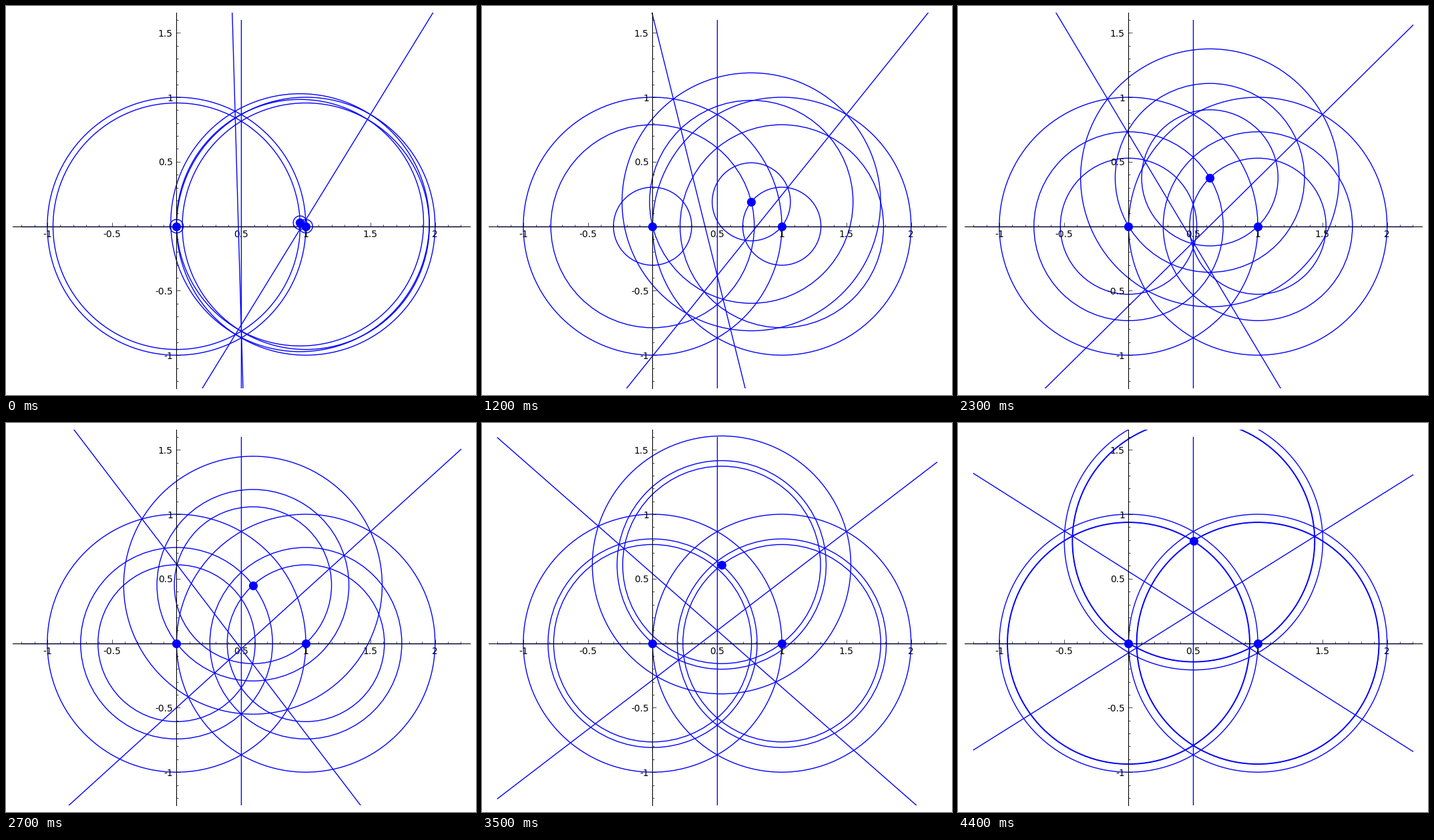
A matplotlib script for the animation above (4500 ms loop, 704 px wide and 584 px high).

```python
import numpy as np
import matplotlib.pyplot as plt
from matplotlib.animation import FuncAnimation
from matplotlib.patches import Circle
from matplotlib.ticker import FuncFormatter, MultipleLocator

W, H, DPI = 704, 584, 100
FRAMES, INTERVAL = 45, 100
BLUE = (0, 0, 1)
X_LINE = np.array([-1.2, 2.2])
X_LIM = (-1.268, 2.268)
Y_LIM = (-1.256, 1.656)
UNIT = 193.6  # pixels per data unit
A, B = np.array([0.0, 0.0]), np.array([1.0, 0.0])
PIVOT = np.array([1.5, np.sqrt(3) / 2])

plt.rcParams["font.family"] = "DejaVu Sans"
fig = plt.figure(figsize=(W / DPI, H / DPI), dpi=DPI, facecolor="white")

box_w = UNIT * (X_LIM[1] - X_LIM[0])
box_h = UNIT * (Y_LIM[1] - Y_LIM[0])
ax = fig.add_axes([10 / W, (H - 10 - box_h) / H, box_w / W, box_h / H])
ax.set(xlim=X_LIM, ylim=Y_LIM)
ax.patch.set_visible(False)


def style_axes():
    for side in ("top", "right"):
        ax.spines[side].set_visible(False)
    for side in ("left", "bottom"):
        ax.spines[side].set_position(("data", 0))
        ax.spines[side].set_linewidth(0.8)
    label = FuncFormatter(lambda v, _: "" if abs(v) < 1e-9 else f"{v:g}")
    for axis in (ax.xaxis, ax.yaxis):
        axis.set_major_locator(MultipleLocator(0.5))
        axis.set_minor_locator(MultipleLocator(0.1))
        axis.set_major_formatter(label)
    ax.tick_params(which="major", direction="in", length=4, width=0.5,
                   pad=4, labelsize=10)
    ax.tick_params(which="minor", direction="in", length=2, width=0.5)


def add_line(x, y):
    return ax.plot(x, y, color=BLUE, lw=1)[0]


def add_circle(center, radius):
    return ax.add_patch(Circle(center, radius, fill=False, ec=BLUE, lw=1))


def apex(i):
    """Third vertex, sliding along the unit circle around PIVOT."""
    t = np.radians(57 - 1.2 * i)
    return PIVOT - np.array([np.cos(t), np.sin(t)])


def bisector(p, q):
    """Heights of the perpendicular bisector of pq at X_LINE."""
    mid, d = (p + q) / 2, q - p
    return mid[1] - d[0] / d[1] * (X_LINE - mid[0])


style_axes()
add_line(X_LINE, [0, 0])
add_line([0.5, 0.5], [-1.6, 1.6])
bisectors = [add_line(X_LINE, [0, 0]) for _ in range(2)]
circles = [[add_circle(A, 1) for _ in range(3)] for _ in range(3)]
dots = ax.scatter([0, 1, 1], [0, 0, 0], s=90, color=BLUE, lw=0, zorder=5)


def update(i):
    c = apex(i)
    points = (A, B, c)
    radii = (1, np.linalg.norm(c - A), np.linalg.norm(c - B))
    for center, ring in zip(points, circles):
        for radius, circle in zip(radii, ring):
            circle.set_center(center)
            circle.set_radius(radius)
    for line, end in zip(bisectors, (A, B)):
        line.set_ydata(bisector(end, c))
    dots.set_offsets(points)
    return [*bisectors, *sum(circles, []), dots]


anim = FuncAnimation(fig, update, frames=FRAMES, interval=INTERVAL,
                     init_func=lambda: update(0), repeat=True, repeat_delay=0)
plt.show()
```
